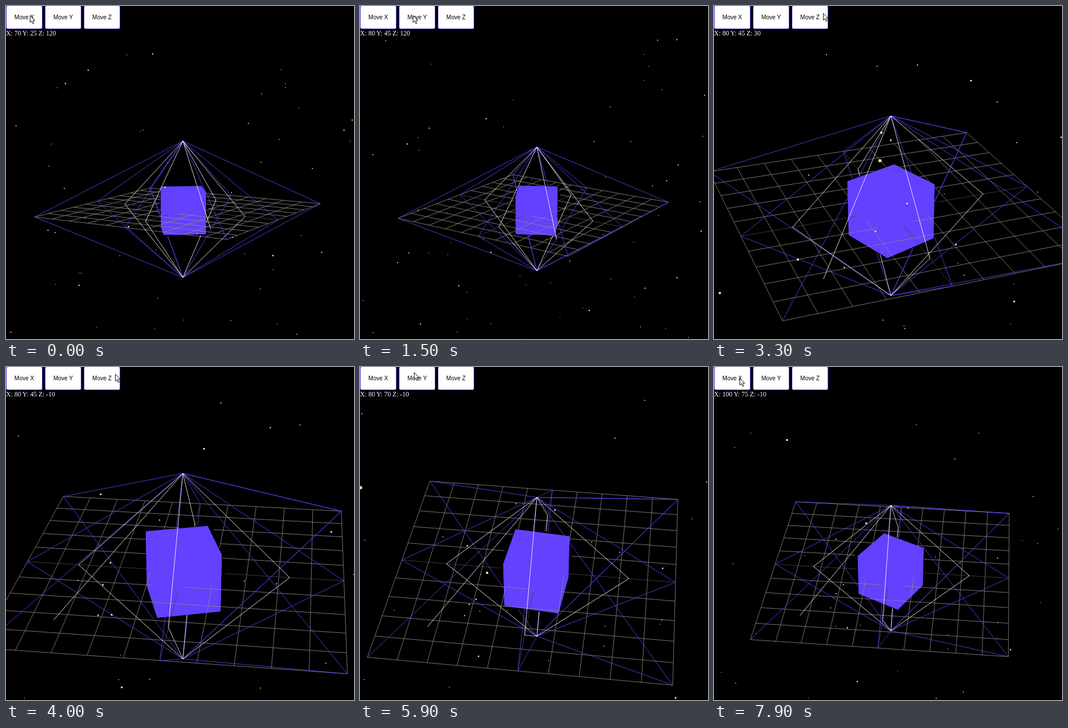
Animation of 600x576 px, one loop 8000 ms. Source, as an HTML page with a canvas:

```html
<!DOCTYPE html>
<html lang="en">
<head>
<meta charset="utf-8">
<title>Camera controls</title>
<style>
  html, body { margin: 0; width: 100%; height: 100%; overflow: hidden; background: #000; }
  #stage { position: relative; width: 600px; height: 576px; overflow: hidden; }
  canvas { position: absolute; left: 0; top: 55px; }
  .button {
    position: absolute; top: -1px; width: 63px; height: 41px; box-sizing: border-box;
    border: 1px solid #4a30d8; border-radius: 3px; background: #fff; color: #000;
    font: 10px/40px "Liberation Sans", Arial, sans-serif; text-align: center;
  }
  #readout {
    position: absolute; left: 0; top: 41px; color: #fff; white-space: pre;
    font: 11.5px/13px "Liberation Serif", "Times New Roman", serif;
  }
  #cursor { position: absolute; left: 0; top: 0; overflow: visible; }
</style>
</head>
<body>
<div id="stage">
  <canvas id="scene" width="600" height="521"></canvas>
  <div class="button" style="left:0">Move X</div>
  <div class="button" style="left:67px">Move Y</div>
  <div class="button" style="left:134px">Move Z</div>
  <div id="readout"></div>
  <svg id="cursor" width="10" height="16">
    <path d="M.5.5V12.3L3.2 9.8 5.2 14.6 7.2 13.7 5.2 9.1H9Z" fill="#fff" stroke="#000" stroke-width=".9"/>
  </svg>
</div>
<script>
const LOOP = 8000;
const FOCAL = 1692, CENTER_X = 305, CENTER_Y = 298;
const PURPLE = '#6440ff';
const CUBE_HALF = 3;

const ctx = document.getElementById('scene').getContext('2d');
const readout = document.getElementById('readout');
const cursor = document.getElementById('cursor');

// Runs of button clicks: axis, amount per click, first click, interval, count
const CLICKS = [
  [0, 5, 200, 200, 2],
  [1, 5, 800, 175, 4],
  [2, -10, 1900, 165, 13],
  [1, 5, 4650, 275, 6],
  [0, 5, 6950, 250, 4]
];
const POINTER = [
  [0, 41, 16], [450, 41, 16], [750, 91, 16], [1500, 91, 16], [1850, 188, 12],
  [4000, 188, 12], [4450, 93, 9], [6200, 93, 9], [6600, 52, 20], [6850, 52, 20],
  [7100, 44, 19], [LOOP, 44, 19]
];
const SPIN = [
  [0, 35], [1500, 119.5], [3300, 199.7], [4000, 288.1],
  [5300, 337.1], [6800, 383.2], [7900, 422.6], [LOOP, 426]
];

const smooth = u => u * u * (3 - 2 * u);

function sample(keys, t, ease = u => u) {
  const i = Math.max(1, keys.findIndex(key => key[0] > t));
  const from = keys[i - 1], to = keys[i];
  const u = ease((t - from[0]) / (to[0] - from[0]));
  return from.slice(1).map((value, k) => value + (to[k + 1] - value) * u);
}

function cameraPosition(t) {
  const position = [70, 25, 120];
  for (const [axis, amount, start, interval, count] of CLICKS) {
    const done = Math.floor((t - start) / interval) + 1;
    position[axis] += amount * Math.min(count, Math.max(0, done));
  }
  return position;
}

// Camera at the given place, looking at the world origin
function makeProjector([cx, cy, cz]) {
  const reach = Math.hypot(cx, cz), distance = Math.hypot(reach, cy);
  return ([x, y, z]) => {
    const right = (x * cz - z * cx) / reach;
    const back = (x * cx + z * cz) / reach;
    const up = (y * reach - back * cy) / distance;
    const depth = distance - (back * reach + y * cy) / distance;
    const scale = FOCAL / depth;
    return { x: CENTER_X + right * scale, y: CENTER_Y - up * scale, depth, scale };
  };
}

// True when the cube stands between the camera and a point
function makeOcclusionTest(camera, angle) {
  const c = Math.cos(angle), s = Math.sin(angle);
  const toLocal = ([x, y, z]) => [x * c - z * s, y, x * s + z * c];
  const eye = toLocal(camera);
  return point => {
    const local = toLocal(point);
    let enter = 0, leave = 1;
    for (let k = 0; k < 3; k++) {
      const d = local[k] - eye[k] || 1e-9;
      const a = (-CUBE_HALF - eye[k]) / d, b = (CUBE_HALF - eye[k]) / d;
      enter = Math.max(enter, Math.min(a, b));
      leave = Math.min(leave, Math.max(a, b));
    }
    return enter < leave && enter < 0.9999;
  };
}

// One continuous line over the top and bottom tips, ending at an open corner
function diamondPath(waist, radius) {
  const path = [[0, 10, 0]];
  waist.forEach(([x, z], i) => {
    path.push([x * radius, 0, z * radius], [0, i % 2 ? 10 : -10, 0]);
  });
  path.push([radius, 0, radius]);
  return path;
}

const SIDES = [[0, 1], [0, -1], [1, 0], [-1, 0]];
const OUTER = diamondPath([...SIDES, [1, -1], [-1, 1], [-1, -1], [-1, -1]], 15);
const INNER = diamondPath(SIDES, 10);

const GRID = [];
for (let v = -15; v <= 15; v += 3) {
  const color = v ? '#888' : '#444';
  GRID.push({ color, path: [[v, 0, -15], [v, 0, 15]] });
  GRID.push({ color, path: [[-15, 0, v], [15, 0, v]] });
}
const LINES = [...GRID, { color: PURPLE, path: OUTER }, { color: '#fff', path: INNER }];

let seed = 20;
function random() {
  seed = (seed * 1664525 + 1013904223) % 4294967296;
  return seed / 4294967296;
}
const STARS = Array.from({ length: 200 }, () => ({
  place: [0, 0, 0].map(() => (random() - 0.5) * 100),
  color: random() < 0.5 ? '#fff' : '#ffffb0'
}));

function drawLine(path, color, project, hidden) {
  const STEPS = 60;
  ctx.strokeStyle = color;
  ctx.beginPath();
  for (let i = 1; i < path.length; i++) {
    const a = path[i - 1], b = path[i];
    let drawing = false;
    for (let k = 0; k <= STEPS; k++) {
      const point = a.map((v, n) => v + (b[n] - v) * k / STEPS);
      if (hidden(point)) { drawing = false; continue; }
      const p = project(point);
      if (drawing) ctx.lineTo(p.x, p.y);
      else ctx.moveTo(p.x, p.y);
      drawing = true;
    }
  }
  ctx.stroke();
}

function drawCube(angle, project) {
  const c = Math.cos(angle), s = Math.sin(angle);
  const corner = [[-1, -1], [1, -1], [1, 1], [-1, 1]].map(([x, z]) =>
    [CUBE_HALF * (x * c + z * s), CUBE_HALF * (z * c - x * s)]);
  const level = y => corner.map(([x, z]) => project([x, y, z]));
  const top = level(CUBE_HALF), bottom = level(-CUBE_HALF);
  const faces = [top, bottom];
  for (let i = 0; i < 4; i++) {
    const j = (i + 1) % 4;
    faces.push([top[i], top[j], bottom[j], bottom[i]]);
  }
  ctx.fillStyle = PURPLE;
  for (const face of faces) {
    ctx.beginPath();
    face.forEach(p => ctx.lineTo(p.x, p.y));
    ctx.fill();
  }
}

function drawStars(project, hidden) {
  for (const { place, color } of STARS) {
    const p = project(place);
    if (p.depth < 1 || hidden(place)) continue;
    ctx.fillStyle = color;
    ctx.beginPath();
    ctx.arc(p.x, p.y, 0.065 * p.scale, 0, 2 * Math.PI);
    ctx.fill();
  }
}

function render(t) {
  const camera = cameraPosition(t);
  const angle = sample(SPIN, t)[0] * Math.PI / 180;
  const project = makeProjector(camera);
  const hidden = makeOcclusionTest(camera, angle);

  ctx.clearRect(0, 0, 600, 521);
  ctx.lineWidth = 0.85;
  drawCube(angle, project);
  for (const { path, color } of LINES) drawLine(path, color, project, hidden);
  drawStars(project, hidden);

  const [x, y, z] = camera;
  readout.textContent = `X: ${x} Y: ${y} Z: ${z}`;
  const [px, py] = sample(POINTER, t, smooth);
  cursor.style.transform = `translate(${px}px, ${py}px)`;
}

const start = performance.now();
function tick() {
  render((performance.now() - start) % LOOP);
  requestAnimationFrame(tick);
}
tick();
</script>
</body>
</html>
```
